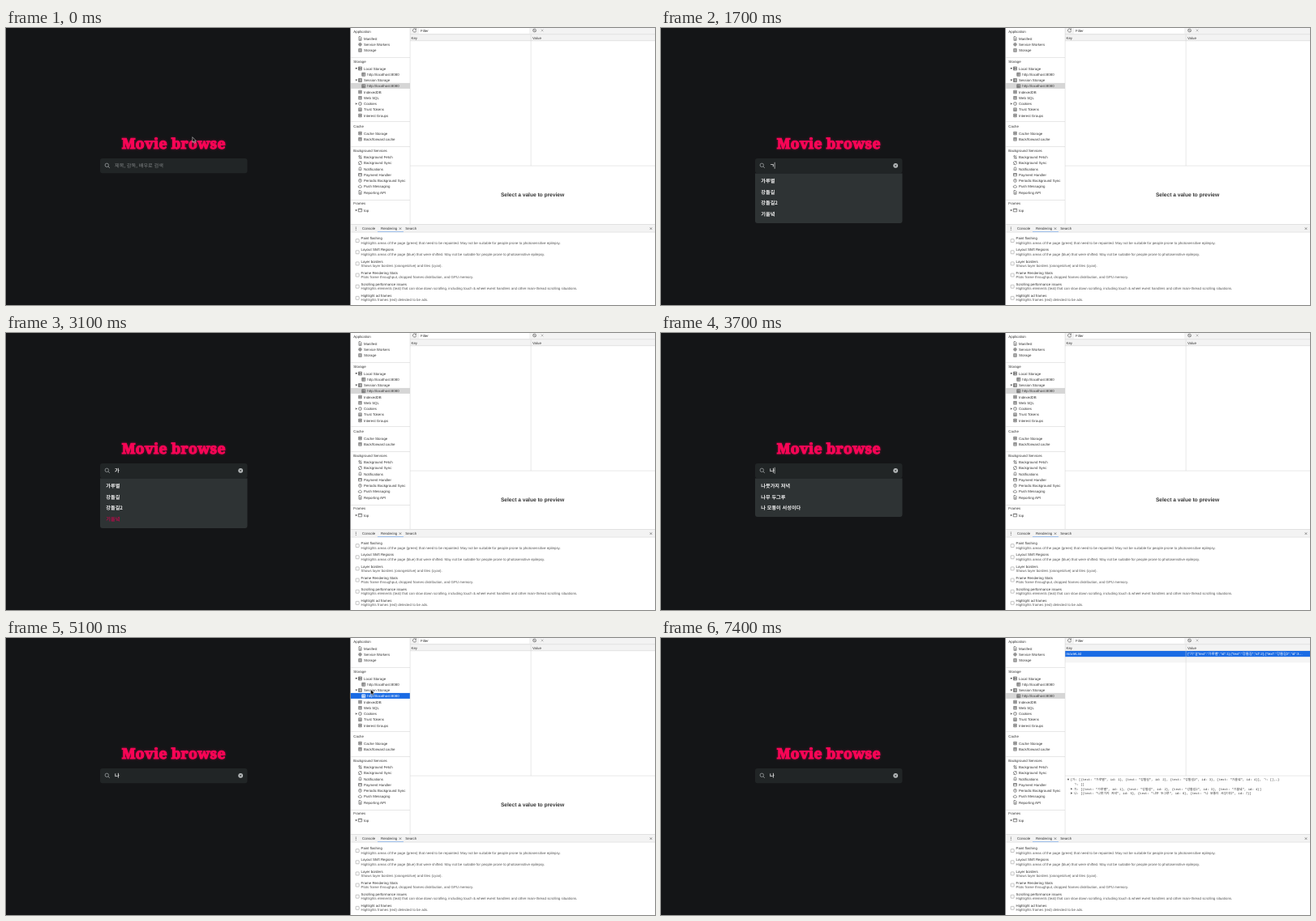
Animation, 800 px wide and 342 px high, one loop 7.99 s. Source, as an HTML page:

```html
<!DOCTYPE html>
<html lang="ko">
<head>
<meta charset="utf-8">
<title>Movie browse</title>
<style>
html, body { margin: 0; height: 100%; overflow: hidden; background: #141517; }
svg { display: block; width: 100vw; height: 100vh; }
text { font: 4.4px "Liberation Sans", "Noto Sans CJK KR", sans-serif; fill: #333; white-space: pre; text-rendering: geometricPrecision; }
.ko { font: 500 6.2px "Noto Sans CJK KR", sans-serif; fill: #f2f2f2; }
.item { font-weight: 700; }
.hint { fill: #7e8283; }
.info { fill: #555; }
.mono { font: 3.9px "Liberation Mono", "Noto Sans CJK KR", monospace; }
.big { font-size: 6.6px; font-weight: 700; }
.logo { font: 700 17.6px "Noto Serif", serif; letter-spacing: .35px; fill: #f80556; stroke: #f80556; stroke-width: 1.2; filter: drop-shadow(0 0 1.4px #f8055670); }
.ico { fill: none; stroke: #606060; stroke-width: .7; }
.on text { fill: #fff; }
.on .ico { stroke: #fff; }
</style>
</head>
<body>
<svg id="stage" viewBox="0 0 800 342" preserveAspectRatio="none"></svg>
<script>
const LOOP = 7990, BLUE = '#1a6be4', GREY = '#d6d6d6', BAR = '#f3f3f3';
const listA = ['가루별', '강돌길', '강돌길2', '기울녘'];
const listB = ['나뭇가지 저녁', '나무 두그루', '나 모퉁이 서성이다'];

const text = (x, mid, s, cls = '', more = '') =>
  `<text x="${x}" y="${mid + 1.6}" class="${cls}" ${more}>${s}</text>`;
const rect = (x, y, w, h, fill, more = '') =>
  `<rect x="${x}" y="${y}" width="${w}" height="${h}" fill="${fill}" ${more}/>`;
const path = (x, y, d, cls = 'ico', more = '') =>
  `<path transform="translate(${x} ${y})" d="${d}" class="${cls}" ${more}/>`;
const group = (id, body) => `<g id="${id}">${body}</g>`;
const hline = (x, y, w) => rect(x, y, w, .5, '#cfcfcf');
const arrow = (x, y, open) =>
  path(x, y, open ? 'M-1.3-.9H1.3L0 1.2Z' : 'M-.9-1.3V1.3L1.2 0Z', '', 'fill="#555"');

const ring = r => `M${-r} 0A${r} ${r} 0 1 0 ${r} 0A${r} ${r} 0 1 0 ${-r} 0`;
const icons = {
  doc: 'M-1.5-2.3H.5L1.6-1.2V2.3H-1.5ZM-.6.2H.8M-.6 1.2H.8',
  gear: ring(1.4) + 'M0-2.4V-1.4M0 1.4V2.4M-2.4 0H-1.4M1.4 0H2.4M-1.6-1.6L1.6 1.6M-1.6 1.6L1.6-1.6',
  db: 'M-1.7-1.8H1.7M-1.7-.6H1.7M-1.7.6H1.7M-1.7 1.8H1.7M-1.7-2V2M1.7-2V2',
  grid: 'M-2-2H2V2H-2ZM-2-.6H2M-2 .7H2M-.6-2V2',
  cookie: ring(1.9) + 'M-.8-.5H-.2M.4.7H1M.4-.7H.9',
  swap: 'M-1 2V-2L-2-.8M-1-2L0-.8M1-2V2L0 .8M1 2L2 .8',
  sync: 'M-1.9.5A1.9 1.9 0 0 1 1.3-1.4M1.9-.5A1.9 1.9 0 0 1-1.3 1.4M1.5-2.4V-1H.2M-1.5 2.4V1H-.2',
  bell: 'M-1.9 1.3H1.9L1.3.6V-.7A1.3 1.3 0 0 0-1.3-.7V.6ZM-.4 2.1H.4',
  card: 'M-2-1.6H2V1.6H-2ZM-2-.5H2',
  clock: ring(1.9) + 'M0-1.1V.1L.9.7',
  cloud: 'M-1.2 1.4A1.1 1.1 0 0 1-1.2-.8A1.5 1.5 0 0 1 1.4-.5A1 1 0 0 1 1.4 1.4Z',
  frame: 'M-2.2-1.8H2.2V1.8H-2.2ZM-2.2-1.2H2.2'
};

const headings = [[4.3, 'Application'], [41.3, 'Storage'], [121.5, 'Cache'],
  [151, 'Background Services'], [216.5, 'Frames']];
// first row centre, then label:icon pairs, one every 7.25px
const blocks = [
  [13, 'Manifest:doc Service Workers:gear Storage:db'],
  [50, 'Local Storage:grid @:grid Session Storage:grid @:grid IndexedDB:db Web SQL:db Cookies:cookie Trust Tokens:db Interest Groups:db'],
  [130, 'Cache Storage:db Back/forward cache:db'],
  [159.4, 'Background Fetch:swap Background Sync:sync Notifications:bell Payment Handler:card Periodic Background Sync:clock Push Messaging:cloud Reporting API:doc'],
  [225, 'top:frame']
];

function sidebar() {
  let out = rect(425, 60.6, 73, 7, 'none', 'id="parentBg"') +
    rect(425, 67.9, 73, 7, GREY, 'id="hostBg"');
  for (const [y, s] of headings) out += text(428.3, y, s);
  for (const y of [36.5, 115.5, 146.5, 212]) out += hline(425, y, 73);
  for (const [top, rows] of blocks) {
    [...rows.matchAll(/(.+?):(\w+) ?/g)].forEach(([, label, icon], i) => {
      const y = top + i * 7.25, sub = label === '@' ? 4.3 : 0;
      const id = top === 50 && i === 2 ? 'parentRow' : top === 50 && i === 3 ? 'hostRow' : 'row' + y;
      if (/^(Local|Session|Cookies|top)/.test(label)) out += arrow(431.8, y, icon === 'grid');
      out += group(id, path(436.5 + sub, y, icons[icon]) +
        text(441 + sub, y, sub ? 'http://localhost:8080' : label));
    });
  }
  return out;
}

const rowsOf = (items, from) => items.map((s, i) => `{text: "${s}", id: ${i + from}}`).join(', ');

function storage() {
  const cell = '{"가":[' + listA.slice(0, 3).map((s, i) => `{"text":"${s}","id":${i + 1}`).join('},') + '…';
  return group('table',
    rect(498, 0, 302, 16, BAR) + rect(509, 0, 136, 7, '#fff') +
    path(503.5, 3, 'M1.6-1.4A2.1 2.1 0 1 0 2.1.4M2-2.4V-.9H.5') + text(511, 3, 'Filter') +
    path(651.5, 3, ring(1.9) + 'M-1.3-1.3L1.3 1.3') +
    path(661, 3, 'M-1.4-1.4L1.4 1.4M1.4-1.4L-1.4 1.4', 'ico', 'opacity=".5"') +
    hline(498, 7.6, 302) + text(499.5, 12, 'Key') + text(649, 12, 'Value') + hline(498, 15.6, 302) +
    group('entry', rect(498, 23.2, 302, 7.2, '#f5f5f5') + rect(498, 16, 302, 7.2, GREY, 'id="entryBg"') +
      group('entryText', text(499.5, 19.6, 'movieList') + text(649, 19.6, cell))) +
    rect(646.8, 8, .5, 162, '#cfcfcf') + hline(498, 169.8, 302) +
    group('noValue', text(649, 206.8, 'Select a value to preview', 'big', 'text-anchor="middle"')) +
    group('preview', arrow(502, 174.7, true) +
      text(504.5, 174.4, `{가: [${rowsOf(listA, 1)}], ㄱ: [],…}`, 'mono') +
      text(509, 180.4, 'ㄱ: []', 'mono') +
      arrow(506, 186.2) + text(509, 186, `가: [${rowsOf(listA, 1)}]`, 'mono') +
      arrow(506, 191.6) + text(509, 191.4, `나: [${rowsOf(listB, 5)}]`, 'mono')));
}

const epilepsy = ' May not be suitable for people prone to photosensitive epilepsy.';
const options = [
  ['Paint flashing', 'Highlights areas of the page (green) that need to be repainted.' + epilepsy],
  ['Layout Shift Regions', 'Highlights areas of the page (blue) that were shifted.' + epilepsy],
  ['Layer borders', 'Shows layer borders (orange/olive) and tiles (cyan).'],
  ['Frame Rendering Stats', 'Plots frame throughput, dropped frames distribution, and GPU memory.'],
  ['Scrolling performance issues', 'Highlights elements (teal) that can slow down scrolling, including touch &amp; wheel event handlers and other main-thread scrolling situations.'],
  ['Highlight ad frames', 'Highlights frames (red) detected to be ads.']
];
const cross = (x, y) => path(x, y, 'M-1.2-1.2L1.2 1.2M1.2-1.2L-1.2 1.2');

function drawer() {
  return rect(425, 242, 375, 10, BAR) + hline(425, 242, 375) + hline(425, 251.8, 375) +
    [-1.6, 0, 1.6].map(d => `<circle cx="431.3" cy="${247.6 + d}" r=".5" fill="#555"/>`).join('') +
    text(439, 247.4, 'Console') + text(462, 247.4, 'Rendering') + text(492.3, 247.4, 'Search') +
    cross(486, 247.6) + cross(795, 247.6) + rect(458, 251.4, 32, .6, '#6ba3ee') +
    options.map(([name, info], i) => {
      const y = 262.4 + i * 14.15;
      return rect(431.2, y - 1.8, 4, 4, '#fff', 'rx=".5" stroke="#888" stroke-width=".5"') +
        text(437.5, y - 2.8, name) + text(437.5, y + 2.5, info, 'info');
    }).join('');
}

const dropdown = (id, items) => group(id,
  `<path d="M116 179.5H297.5V${182.7 + 13.8 * items.length}q0 3-3 3H119q-3 0-3-3Z" fill="#2e3334"/>` +
  items.map((s, i) => text(123.3, 188.5 + 13.8 * i, s, 'ko item', `dy=".6" id="${id}${i}"`)).join(''));

const $ = id => document.getElementById(id);
$('stage').innerHTML =
  rect(0, 0, 424.5, 342, '#141517') + rect(424.5, 0, 375.5, 342, '#fff') +
  '<text class="logo" x="206.8" y="149" text-anchor="middle">Movie browse</text>' +
  rect(116, 161, 181.5, 18.3, '#212526', 'rx="3"') +
  path(124.3, 169.3, ring(2.2) + 'M1.6 1.6L3.6 3.6', '', 'fill="none" stroke="#9a9ea0" stroke-width=".8"') +
  text(134, 169.6, '제목, 감독, 배우로 검색', 'ko hint', 'dy=".6" id="hint"') +
  text(134, 169.3, '', 'ko item', 'dy=".6" id="typed"') +
  rect(134, 165.8, .6, 8, '#f2f2f2', 'id="caret"') +
  group('clear', '<circle cx="289.2" cy="169.8" r="2.9" fill="#b9bdbe"/>' +
    path(289.2, 169.8, 'M-1.1-1.1L1.1 1.1M1.1-1.1L-1.1 1.1', '', 'stroke="#212526" stroke-width=".7"')) +
  dropdown('a', listA) + dropdown('b', listB) +
  sidebar() + storage() + rect(497.8, 0, .5, 242, '#cfcfcf') + drawer() +
  '<path id="cursor" d="M0 0V6.6L1.5 5.2 2.5 7.5 3.7 7 2.7 4.8H4.7Z" fill="#111" stroke="#ddd" stroke-width=".55"/>';

// step tracks: [time, value]
const typing = [[0, ''], [600, 'ㄱ'], [700, '가'], [1700, 'ㄱ'], [1800, ''], [2300, '가'],
  [3300, 'ㄱ'], [3400, ''], [3600, 'ㄴ'], [3700, '나']];
const caret = [[0, 0], [300, 1], [1400, 0], [1700, 1], [2100, 0], [2300, 1], [2800, 0],
  [3300, 1], [4000, 0], [4500, 1], [4800, 0]];
const menu = [[0, ''], [1000, 'a'], [1800, ''], [2500, 'a'], [3400, ''], [3700, 'b'], [4800, '']];
const picked = [[0, -1], [2700, 0], [2800, 1], [2900, 2], [3000, 3], [3300, -1]];
const focus = [[0, 'none'], [4800, 'host'], [5200, 'parent'], [5500, 'host'], [6500, 'entry']];
// pointer trips: [time, x, y], hidden after the last point
const trips = [
  [[0, 229.8, 134.6], [300, 150, 167]],
  [[4200, 250, 186], [4700, 452, 69], [5000, 452, 69], [5100, 449.5, 63.5], [5200, 449.5, 63.5],
    [5500, 450, 69.5], [5700, 450, 69.5], [5800, 450.5, 69.8], [5900, 450.5, 69.8],
    [6300, 532.5, 19.7], [6700, 535, 18], [6800, 535, 18], [7100, 557, 181], [7400, 500, 4]]
];

const at = (track, t) => track.filter(k => k[0] <= t).pop()[1];
const show = (id, on) => $(id).style.display = on ? '' : 'none';

function pointer(t) {
  const trip = trips.find(p => t >= p[0][0] && t < p[p.length - 1][0]);
  show('cursor', trip);
  if (!trip) return;
  const i = trip.findIndex(k => k[0] > t), [t0, x0, y0] = trip[i - 1], [t1, x1, y1] = trip[i];
  const u = (t - t0) / (t1 - t0);
  $('cursor').setAttribute('transform', `translate(${x0 + (x1 - x0) * u} ${y0 + (y1 - y0) * u})`);
}

function highlight(name, on, idle) {
  $(name + 'Bg').setAttribute('fill', on ? BLUE : idle);
  $(name + (name === 'entry' ? 'Text' : 'Row')).setAttribute('class', on ? 'on' : '');
}

function draw(t) {
  const word = at(typing, t), open = at(menu, t), pick = at(picked, t), f = at(focus, t);
  const filled = t >= 5500;
  $('typed').textContent = word;
  show('hint', !word);
  show('clear', word);
  show('caret', at(caret, t));
  $('caret').setAttribute('x', word ? 139.8 : 133.8);
  show('a', open === 'a');
  show('b', open === 'b');
  listA.forEach((_, i) => $('a' + i).style.fill = i === pick ? '#b00d48' : '');
  highlight('host', f === 'host', f === 'parent' ? 'none' : GREY);
  highlight('parent', f === 'parent', 'none');
  highlight('entry', f === 'entry', '#dcdcdc');
  show('table', f !== 'parent');
  show('entry', filled);
  show('preview', filled);
  show('noValue', !filled);
  pointer(t);
}

const start = performance.now();
function tick() {
  const t = (performance.now() - start) % LOOP;
  draw(Math.floor(t / 100) * 100);
  requestAnimationFrame(tick);
}
tick();
</script>
</body>
</html>
```
